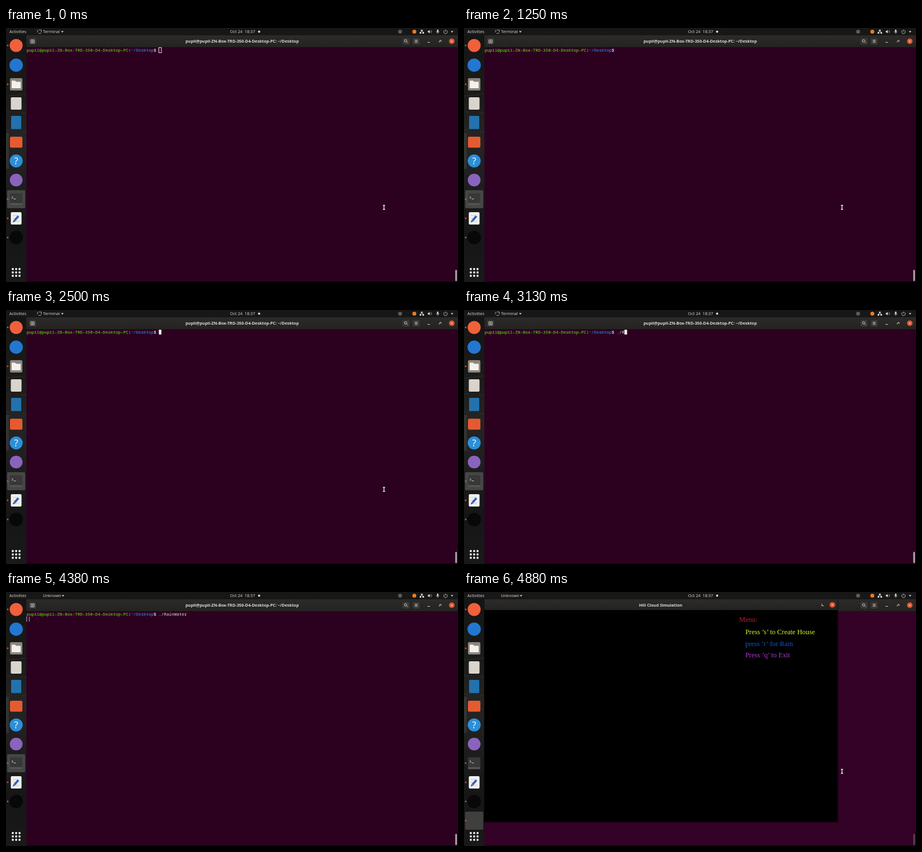
Animation of 800x451 px, one loop 5.01 s. Source, as an HTML page:

```html
<!DOCTYPE html>
<html lang="en">
<head>
<meta charset="utf-8">
<title>Desktop recording</title>
<style>
html, body { margin: 0; width: 100%; height: 100%; overflow: hidden; background: #161616; }
svg { display: block; width: 100%; height: 100%; }
text { white-space: pre; }
.ui { font: 7.3px "Open Sans", "Noto Sans", sans-serif; fill: #dcdad8; }
.bold { font-weight: 700; }
.mono { font: 7.5px "Noto Sans Mono", "DejaVu Sans Mono", monospace; fill: #e4dfe2; }
.prompt { font-weight: 700; }
.serif { font: 12.35px "Liberation Serif", "Times New Roman", serif; }
.line { fill: none; stroke: #cfcdca; stroke-width: 1; }

/* every state switches hard on one shared 5010 ms clock */
.t { animation: 5010ms step-end infinite; }
.hollow { animation-name: hollow; }
.blink { animation-name: blink; }
.caret { animation-name: caret; }
.k1 { animation-name: k1; }
.k2 { animation-name: k2; }
.k3 { animation-name: k3; }
.k4 { animation-name: k4; }
.idle { animation-name: idle; }
.wait { animation-name: wait; }
.front { animation-name: front; }
.open { animation-name: open; }
.settled { animation-name: settled; }
.opening { animation-name: opening; }
.pointer { animation-name: pointer; }
.win { animation-name: grow; transform-origin: 348px 210px; }
.tile { animation-name: tile; transform-origin: 18px 406px; }

@keyframes hollow { 0% { opacity: 1 } 2.594%, 100% { opacity: 0 } }
@keyframes blink {
  0% { opacity: 0 } 2.594% { opacity: 1 } 14.97% { opacity: 0 }
  27.54% { opacity: 1 } 39.92% { opacity: 0 } 49.9% { opacity: 1 }
  87.42%, 100% { opacity: 0 }
}
@keyframes caret {
  0% { transform: translate(0, 0) } 57.48% { transform: translate(9px, 0) }
  62.47% { transform: translate(13.5px, 0) } 67.46% { transform: translate(18px, 0) }
  69.86% { transform: translate(49.5px, 0) } 79.84%, 100% { transform: translate(-234px, 9px) }
}
@keyframes k1 { 0% { opacity: 0 } 57.48%, 100% { opacity: 1 } }
@keyframes k2 { 0% { opacity: 0 } 62.47%, 100% { opacity: 1 } }
@keyframes k3 { 0% { opacity: 0 } 67.46%, 100% { opacity: 1 } }
@keyframes k4 { 0% { opacity: 0 } 69.86%, 100% { opacity: 1 } }
@keyframes idle { 0% { opacity: 1 } 87.42%, 100% { opacity: 0 } }
@keyframes wait { 0% { opacity: 0 } 87.42%, 100% { opacity: 1 } }
@keyframes front { 0% { opacity: 1 } 89.82%, 100% { opacity: 0 } }
@keyframes open { 0% { opacity: 0 } 89.82%, 100% { opacity: 1 } }
@keyframes settled { 0% { opacity: 0 } 92.41%, 100% { opacity: 1 } }
@keyframes opening { 0% { opacity: 0 } 89.82% { opacity: 1 } 92.41%, 100% { opacity: 0 } }
/* hidden while typing, back once the mouse moves */
@keyframes pointer { 0% { opacity: 1 } 57.48% { opacity: 0 } 97.4%, 100% { opacity: 1 } }
@keyframes grow { 0% { transform: scale(.995) } 92.41%, 100% { transform: none } }
@keyframes tile { 0% { transform: scale(.8) } 92.41%, 100% { transform: none } }
</style>
</head>
<body>
<svg viewBox="0 0 800 451" preserveAspectRatio="none">
  <defs>
    <linearGradient id="dock" x2="0" y2="1">
      <stop offset="0" stop-color="#151515"/>
      <stop offset=".25" stop-color="#1b1b1a"/>
      <stop offset=".42" stop-color="#252524"/>
      <stop offset=".6" stop-color="#1e1e1e"/>
      <stop offset=".8" stop-color="#161616"/>
      <stop offset="1" stop-color="#191919"/>
    </linearGradient>
    <linearGradient id="bar" x2="0" y2="1">
      <stop offset="0" stop-color="#2c2b29"/>
      <stop offset="1" stop-color="#242321"/>
    </linearGradient>
    <g id="close">
      <circle r="4.9" fill="#e2552c"/>
      <path d="M-1.7-1.7 1.7 1.7M1.7-1.7-1.7 1.7" stroke="#f6e3dc" stroke-width=".9"/>
    </g>
    <rect id="btn" x="-7" y="-6.5" width="14" height="13" rx="2" fill="#383735" stroke="#1d1c1b" stroke-width=".6"/>
    <circle id="dot" cx="3" r="1.4" fill="#e0522a"/>
    <path id="dots" d="M12 0H24.100" stroke="#f0f0f0" stroke-width="3.800" stroke-linecap="round" stroke-dasharray="0 6"/>
  </defs>

  <!-- dock -->
  <rect y="12" width="37" height="439" fill="url(#dock)"/>
  <g stroke="#4a4a49" opacity=".4">
    <path d="M0 121 36 117M0 149H8M27 151H36M0 181H7M28 184H36"/>
    <path d="M2.500 186V250" stroke-width="5"/>
  </g>
  <rect class="t front" x="2" y="288" width="32" height="32" rx="2" fill="#464645"/>
  <circle cx="18" cy="31" r="11.5" fill="#f0603a"/>
  <circle cx="18" cy="66" r="11.8" fill="#2377d0"/>
  <g transform="translate(18 100)">
    <rect x="-11" y="-11" width="22" height="22" rx="2.5" fill="#8b857b"/>
    <path d="M-8-6.500H-2L0-4.500H8V7H-8Z" fill="#f4f1ec"/>
  </g>
  <rect x="8.500" y="123" width="19" height="22" rx="2" fill="#d9d5cc"/>
  <rect x="9" y="156" width="18" height="23.500" rx="1.500" fill="#2372ad"/>
  <rect x="7" y="193" width="22" height="19.500" rx="2.500" fill="#e55a30"/>
  <circle cx="18" cy="236" r="11.5" fill="#2c8fd8"/>
  <text class="ui" x="18" y="242" text-anchor="middle" style="font-size:17px;fill:#fff">?</text>
  <circle cx="18" cy="270" r="11.3" fill="#8a63bd"/>
  <g transform="translate(18 304)">
    <rect x="-11" y="-10.500" width="22" height="21" rx="2" fill="#383838"/>
    <path d="M-11 7H11V8.500a2 2 0 0 1-2 2H-9a2 2 0 0 1-2-2Z" fill="#555"/>
    <path class="line" d="M-8-5 -5.500-3 -8-1M-4.500-.5H-.5"/>
  </g>
  <g transform="translate(18 338)">
    <rect x="-9.500" y="-11" width="19" height="22" rx="2" fill="#f1f0ee"/>
    <path d="M-6-5H4M-6 0H0M-6 5H5" stroke="#c9c8c6" stroke-width="1"/>
    <path d="M-3 4 4-4" stroke="#2c62c8" stroke-width="3.800"/>
    <path d="M-6 7-4.700 3.200-1.800 5.800Z" fill="#1f3f80"/>
  </g>
  <circle cx="18" cy="372" r="12" fill="#08080a"/>
  <use href="#dot" y="31"/><use href="#dot" y="100"/><use href="#dot" y="304"/>
  <use href="#dot" y="338"/><use href="#dot" y="372"/>
  <g class="t open"><g class="t tile">
    <rect x="2" y="390" width="32" height="32" rx="2" fill="#3f3f3e"/>
    <use href="#dot" y="406"/>
  </g></g>
  <use href="#dots" y="428"/><use href="#dots" y="434"/><use href="#dots" y="440"/>

  <!-- terminal -->
  <rect x="36" y="13" width="764" height="438" fill="#2c0120"/>
  <rect class="t open" x="36" y="13" width="764" height="438" fill="#340226"/>
  <rect x="36" y="13" width="764" height="21" fill="url(#bar)"/>
  <rect x="36" y="450" width="764" height="1" fill="#14010f"/>
  <use href="#btn" x="47" y="23.500"/>
  <path class="line" d="M44 21H50V26.500H44ZM47 22V25.500M45.300 23.700H48.700"/>
  <text class="ui bold" x="418" y="26.300" text-anchor="middle">pupil@pupil-ZN-Box-TRD-350-D4-Desktop-PC: ~/Desktop</text>
  <use href="#btn" x="708" y="23.500"/>
  <circle class="line" cx="707.300" cy="22.800" r="2.100"/>
  <path class="line" d="M709 24.500 711 26.500"/>
  <use href="#btn" x="726" y="23.500"/>
  <path class="line" d="M723.500 21.500H728.500M723.500 23.500H728.500M723.500 25.500H728.500" style="stroke-width:.9"/>
  <path class="line" d="M746 25.500H750.500M767 25.500V23H768.500M768 22H770V24.500"/>
  <use href="#close" x="789" y="23.500"/>
  <rect x="795.300" y="429.500" width="2.800" height="20" rx="1.400" fill="#5d4355"/>
  <rect class="t front" x="795.300" y="429.500" width="2.800" height="20" rx="1.400" fill="#b5aab1"/>

  <text class="mono prompt" x="36.500" y="42.300"><tspan fill="#55a012">pupil@pupil-ZN-Box-TRD-350-D4-Desktop-PC</tspan>:<tspan fill="#2f68b4">~/Desktop</tspan>$</text>
  <g class="mono">
    <text class="t k1" x="270.500" y="42.300">./</text>
    <text class="t k2" x="279.500" y="42.300">R</text>
    <text class="t k3" x="284" y="42.300">a</text>
    <text class="t k4" x="288.500" y="42.300">inWater</text>
  </g>
  <rect class="t hollow" x="270.500" y="34.800" width="4.500" height="9" fill="none" stroke="#f0edf0"/>
  <g class="t blink"><rect class="t caret" x="270.500" y="35" width="4.500" height="8.500" fill="#fff"/></g>
  <path class="t wait" d="M36.700 43.800V52.500M41.200 43.800V52.500" stroke="#d8d2d6" stroke-width=".9"/>

  <!-- program window -->
  <g class="t open"><g class="t win">
    <rect x="35" y="13" width="628" height="397" fill="#000" opacity=".3"/>
    <rect x="36" y="13" width="625" height="395" fill="#000"/>
    <rect x="36" y="13" width="625" height="19" fill="url(#bar)"/>
    <text class="ui bold" x="348" y="25.600" text-anchor="middle">Hill Cloud Simulation</text>
    <path class="line t opening" d="M616 24.700H620.500"/>
    <path class="line t opening" d="M632.800 20.800H636.800V24.800H632.800Z"/>
    <path class="line t settled" d="M633.300 21V24.500H636.800"/>
    <use href="#close" x="652" y="22.800"/>
    <g class="serif">
      <text x="487" y="53.200" fill="#b8222c">Menu:</text>
      <text x="498" y="74.600" fill="#dcf02c">Press ’s’ to Create House</text>
      <text x="498" y="95.600" fill="#1058d0">press ’r’ for Rain</text>
      <text x="498" y="116.400" fill="#b238d4">Press ’q’ to Exit</text>
    </g>
  </g>
  <path class="t opening" d="M37 44V52.500" stroke="#b8b4b8" stroke-width=".9"/></g>

  <!-- top panel -->
  <rect width="800" height="13" fill="#171717"/>
  <g class="ui">
    <text x="6" y="9.200">Activities</text>
    <g class="t idle">
      <path class="line" d="M54.500 3.500 57 5.500 54.500 7.500M57.500 9.500H62M58 3.500H62.500V8" style="stroke-width:.8"/>
      <text x="65.500" y="9.200">Terminal</text>
      <path d="M97.500 5.500H102L99.700 8.200Z"/>
    </g>
    <g class="t wait">
      <text x="65.300" y="9.200">Unknown</text>
      <path d="M98.800 5.500H103.300L101 8.200Z"/>
    </g>
    <text x="396.500" y="9.200">Oct 24  18:37</text>
    <circle cx="448" cy="6.500" r="1.900"/>
    <circle cx="697.500" cy="6.500" r="3.500" fill="#5c5b59"/>
    <circle cx="722.700" cy="6.500" r="3.500" fill="#f07a1c"/>
    <path d="M734.500 3H737.500V5.500H734.500ZM732 7.500H735V10H732ZM737 7.500H740V10H737Z"/>
    <path class="line" d="M736 5V6.800M733.500 8V6.800H738.500V8" style="stroke-width:.8"/>
    <path d="M746.500 5.300H748L750 3.500V9.500L748 7.700H746.500Z"/>
    <path class="line" d="M751.300 5Q752.500 6.500 751.300 8M752.500 3.800Q754.700 6.500 752.500 9.200" style="stroke:#8f8d8b;stroke-width:.8"/>
    <rect x="762.800" y="2.800" width="2.600" height="4.700" rx="1.300"/>
    <path class="line" d="M761.700 6Q761.700 8.500 764.100 8.500T766.500 6M764.100 8.500V10.300" style="stroke-width:.7"/>
    <path class="line" d="M776 4.200A3.200 3.200 0 1 0 779.800 4.200M777.900 2.800V6.300" style="stroke-width:.9"/>
    <path d="M787.300 5.500H791.800L789.500 8.200Z"/>
  </g>

  <!-- text pointer -->
  <g class="t pointer" fill="none">
    <path d="M667 314.800H671M669 315V322M667 322.200H671" stroke="#111" stroke-width="2.600"/>
    <path d="M667 314.800H671M669 315V322M667 322.200H671" stroke="#fff" stroke-width="1.300"/>
  </g>
</svg>
</body>
</html>
```
